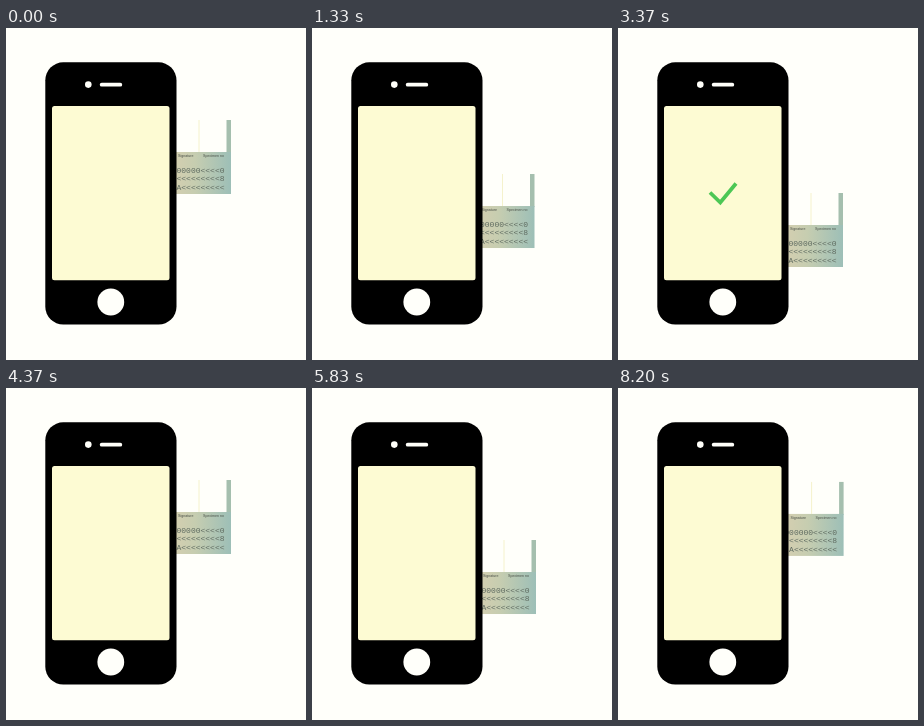
Animation, 300 px wide and 332 px high, one loop 8230 ms. Source, as an HTML page:

```html
<!DOCTYPE html>
<html lang="en">
<head>
<meta charset="utf-8">
<title>Card scan</title>
<style>
  html, body { margin: 0; width: 100%; height: 100%; overflow: hidden; background: #fffffa; }
  svg { display: block; width: 100%; height: 100%; }
  .code { font: 8px "Liberation Mono", monospace; fill: #5f6b60; text-anchor: end; }
  .label { font: 3.6px "Liberation Sans", Arial, sans-serif; fill: #454b43; }
</style>
</head>
<body>
<svg viewBox="0 0 300 332">
  <defs>
    <linearGradient id="paper">
      <stop offset="0" stop-color="#d9cfb0"/>
      <stop offset=".45" stop-color="#c6cdb0"/>
      <stop offset="1" stop-color="#9dbfb7"/>
    </linearGradient>
  </defs>
  <g id="scene">
    <g id="card">
      <path d="M193 92V124" stroke="#f5f2cc"/>
      <rect x="220.5" y="92" width="4.5" height="33" fill="#a5bfae"/>
      <rect x="160" y="124" width="65" height="42" fill="url(#paper)"/>
      <text class="label" x="172" y="129.3">Signature</text>
      <text class="label" x="197" y="129.3">Specimen no</text>
      <text class="code" x="218.5" y="145">000000&lt;&lt;&lt;&lt;0</text>
      <text class="code" x="218.5" y="153.3">&lt;&lt;&lt;&lt;&lt;&lt;&lt;&lt;&lt;8</text>
      <text class="code" x="218.5" y="161.8">A&lt;&lt;&lt;&lt;&lt;&lt;&lt;&lt;&lt;</text>
    </g>
    <rect x="39.3" y="34.3" width="131.2" height="262.2" rx="18"/>
    <rect x="46" y="78" width="117.5" height="174.3" rx="2.5" fill="#fdfbd3"/>
    <g fill="#fffffa">
      <circle cx="82.3" cy="56.6" r="3.3"/>
      <rect x="93.8" y="54.8" width="22.4" height="3.8" rx="1.9"/>
      <circle cx="104.8" cy="274" r="13.4"/>
    </g>
    <path id="check" d="M92 164.5L102.3 174.5L118 155.5" pathLength="1" stroke-dasharray="1 2"
      fill="none" stroke="#4cc755" stroke-width="3.8"/>
  </g>
</svg>
<script>
  const LOOP = 8230, CYCLE = LOOP / 2;
  const [scene, card, check] = ["scene", "card", "check"].map(id => document.getElementById(id));

  // time, x, y of the card
  const path = [
    [0, 0, 0], [350, 0, 0], [870, -1, 27], [1330, -2.5, 54],
    [1715, -1, 60], [2400, 0, 73], [3400, 0, 73], [4085, .6, 2], [CYCLE, 0, 0]
  ];
  const clamp = v => Math.max(0, Math.min(1, v));

  function slope(i, axis) {
    if (i === 0 || i === path.length - 1) return 0;
    const rate = j => (path[j + 1][axis] - path[j][axis]) / (path[j + 1][0] - path[j][0]);
    const a = rate(i - 1), b = rate(i);
    return a * b > 0 ? 2 * a * b / (a + b) : 0;
  }

  // Monotone cubic interpolation along the path
  function along(t, axis) {
    const i = Math.max(0, path.findIndex(p => p[0] > t) - 1);
    const a = path[i], b = path[i + 1], span = b[0] - a[0], u = (t - a[0]) / span;
    const s = u * u * (3 - 2 * u);
    return a[axis] + (b[axis] - a[axis]) * s
      + span * u * (1 - u) * ((1 - u) * slope(i, axis) - u * slope(i + 1, axis));
  }

  function draw(ms) {
    const t = ms % CYCLE;
    card.setAttribute("transform", `translate(${along(t, 1)} ${along(t, 2)})`);
    const nudge = Math.sin(Math.PI * clamp((t - 2600) / 770)) ** 2;
    scene.setAttribute("transform", `translate(${nudge * .8} ${nudge * .6})`);
    const drawn = clamp((t - 2480) / 250);
    check.style.strokeDashoffset = 1 - drawn;
    check.style.opacity = drawn > 0 ? 1 - clamp((t - 3450) / 150) : 0;
  }

  const start = performance.now();
  function tick(now) {
    draw(Math.max(0, now - start) % LOOP);
    requestAnimationFrame(tick);
  }
  draw(0);
  requestAnimationFrame(tick);
</script>
</body>
</html>
```
